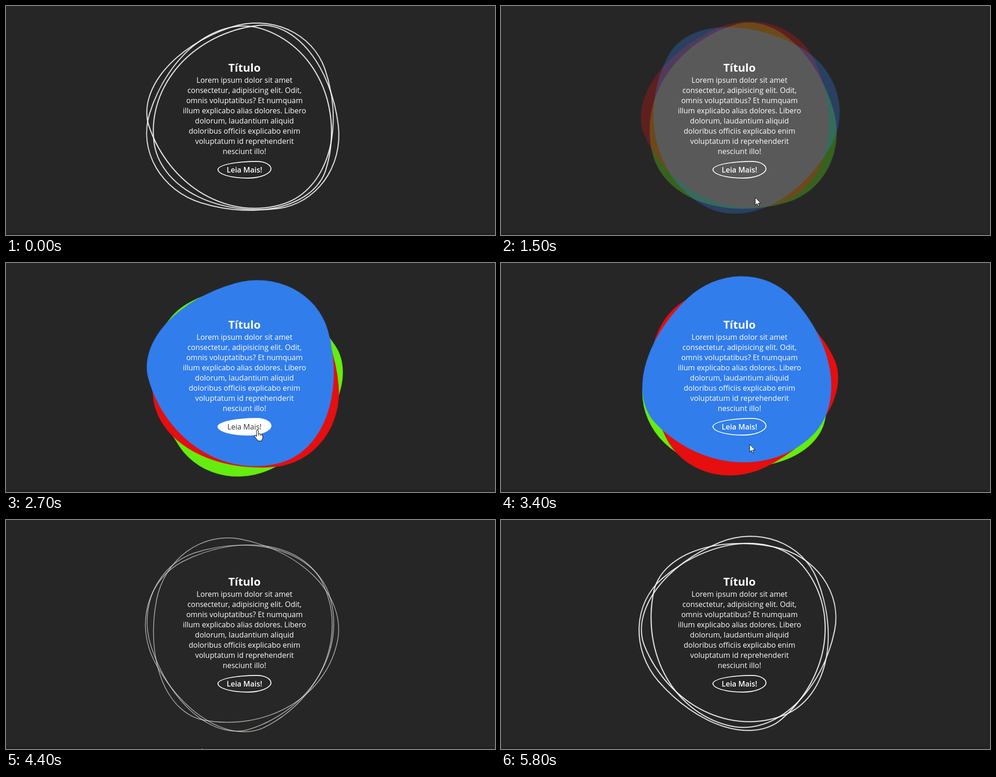
Recreate the animation shown at these times as an HTML page. Size 1052x495 px, loop 6 s.

```html
<!DOCTYPE html>
<html lang="pt">
<head>
<meta charset="utf-8">
<title>Círculo animado</title>
<style>
  html, body { margin: 0; width: 100%; height: 100%; overflow: hidden; }
  body { position: relative; background: #262626; color: #fff; font: 16px/22px "Open Sans", sans-serif; }
  .floor { position: absolute; left: 0; right: 0; top: 491px; bottom: 0; background: #231f20; }
  .circle { position: absolute; left: 313px; top: 45.5px; width: 400px; height: 400px; }
  .blob {
    position: absolute; inset: 0; box-sizing: border-box; border: 0 solid #fff;
    border-radius: 38% 62% 63% 37% / 41% 44% 56% 59%; will-change: transform;
  }
  .content { position: absolute; left: 313px; top: 116px; width: 400px; text-align: center; white-space: nowrap; }
  h2 { margin: 0; font-size: 24px; line-height: 33px; font-weight: 700; }
  p { margin: 0; }
  .more {
    position: absolute; left: 142px; top: 219px; width: 116px; height: 38px; box-sizing: border-box;
    line-height: 34px; font-weight: 600; border: 2px solid #fff;
    border-radius: 73% 27% 44% 56% / 49% 44% 56% 51%;
  }
  .more.over { background: #fff; color: #333; font-weight: 500; }
  svg { position: absolute; left: 0; top: 0; width: 1px; height: 1px; overflow: visible; }
  svg path { fill: #fff; stroke: #000; stroke-width: 1; stroke-linejoin: round; }
</style>
</head>
<body>
<div class="floor"></div>
<div class="circle">
  <div class="blob"></div>
  <div class="blob"></div>
  <div class="blob"></div>
</div>
<div class="content">
  <h2>Título</h2>
  <p>Lorem ipsum dolor sit amet<br>consectetur, adipisicing elit. Odit,<br>omnis voluptatibus? Et numquam<br>illum explicabo alias dolores. Libero<br>dolorum, laudantium aliquid<br>doloribus officiis explicabo enim<br>voluptatum id reprehenderit<br>nesciunt illo!</p>
  <div class="more">Leia Mais!</div>
</div>
<svg id="cursor">
  <path id="arrow" d="M0 0V16.5L3.8 13L6.4 19L8.8 18L6.3 12.2H11.8Z"/>
  <path id="hand" d="M-2 2Q-2 0 0 0T2 2V8Q5 7 6 9Q9 8 9.5 10Q11.500 10 11.500 12V16Q11.500 19 9.500 21V23.500H0V21.500Q-4 18 -6 14Q-7 12 -5 11.500Q-4 11.500 -2 14ZM2 8V12M6 9V13M9.500 10V13"/>
</svg>
<script>
const LOOP = 6000;
const SLOT = 100;                        // display step, ms
const STEP = 0.11;                       // seconds of motion per step
const PAUSES = [12, 24, 35, 47, 59];     // slots that repeat the previous step
const SPIN_OFFSET = 55.19;               // seconds already spun at the start
const HOVER_IN = 1.44, HOVER_OUT = 4.06, FADE = 0.5;

const blobs = [
  { color: "100 237 14", speed: 60 },
  { color: "230 14 14", speed: 90 },
  { color: "49 125 236", speed: -36 },
];

// step, x, y of the pointer tip
const pointerPath = [
  [1, 28, 21], [7, 311, 437], [9, 370, 478], [11, 450, 464], [13, 530, 441],
  [14, 547, 414], [17, 545, 370], [19, 541, 361], [27, 541, 361], [32, 535, 392],
  [37, 500, 448], [39, 465, 478], [41, 421, 492], [43, 166, 435], [46, 32, 280], [50, 55, 2],
];

const $ = selector => document.querySelector(selector);
const blobNodes = document.querySelectorAll(".blob");

// CSS "ease": cubic-bezier(.25, .1, .25, 1)
function ease(x) {
  if (x <= 0) return 0;
  if (x >= 1) return 1;
  const bezier = (a, b, u) => 3 * a * u * (1 - u) ** 2 + 3 * b * u * u * (1 - u) + u ** 3;
  let low = 0, high = 1;
  for (let i = 0; i < 24; i++) {
    const mid = (low + high) / 2;
    if (bezier(0.25, 0.25, mid) < x) low = mid; else high = mid;
  }
  return bezier(0.1, 1, low);
}

function pointerAt(step) {
  const next = pointerPath.findIndex(point => point[0] >= step);
  if (next < 0 || step < pointerPath[0][0]) return null;
  const [endStep, endX, endY] = pointerPath[next];
  const [startStep, startX, startY] = pointerPath[Math.max(next - 1, 0)];
  const part = endStep > startStep ? (step - startStep) / (endStep - startStep) : 1;
  return { x: startX + (endX - startX) * part, y: startY + (endY - startY) * part };
}

function borderWidth(time) {
  if (time < HOVER_IN) return 2;
  if (time < HOVER_OUT) return 0;
  return time < HOVER_OUT + FADE ? 1 : 2;
}

function draw(ms) {
  const slot = Math.floor(ms / SLOT);
  const step = slot - PAUSES.filter(pause => pause <= slot).length;
  const time = step * STEP;

  const alpha = ease((time - HOVER_IN) / FADE) - ease((time - HOVER_OUT) / FADE);
  blobs.forEach(({ color, speed }, i) => {
    const style = blobNodes[i].style;
    style.transform = `rotate(${(time + SPIN_OFFSET) * speed % 360}deg)`;
    style.background = `rgb(${color} / ${alpha})`;
    style.borderWidth = borderWidth(time) + "px";
  });

  const pointer = pointerAt(step);
  const overButton = !!pointer && Math.abs(pointer.x - 513) < 58 && Math.abs(pointer.y - 354) < 19;
  $(".more").classList.toggle("over", overButton);
  $("#cursor").style.display = pointer ? "" : "none";
  if (pointer) $("#cursor").style.transform = `translate(${Math.round(pointer.x)}px, ${Math.round(pointer.y)}px)`;
  $("#arrow").style.display = overButton ? "none" : "";
  $("#hand").style.display = overButton ? "" : "none";
}

function tick() {
  draw(performance.now() % LOOP);
  requestAnimationFrame(tick);
}
tick();
</script>
</body>
</html>
```
